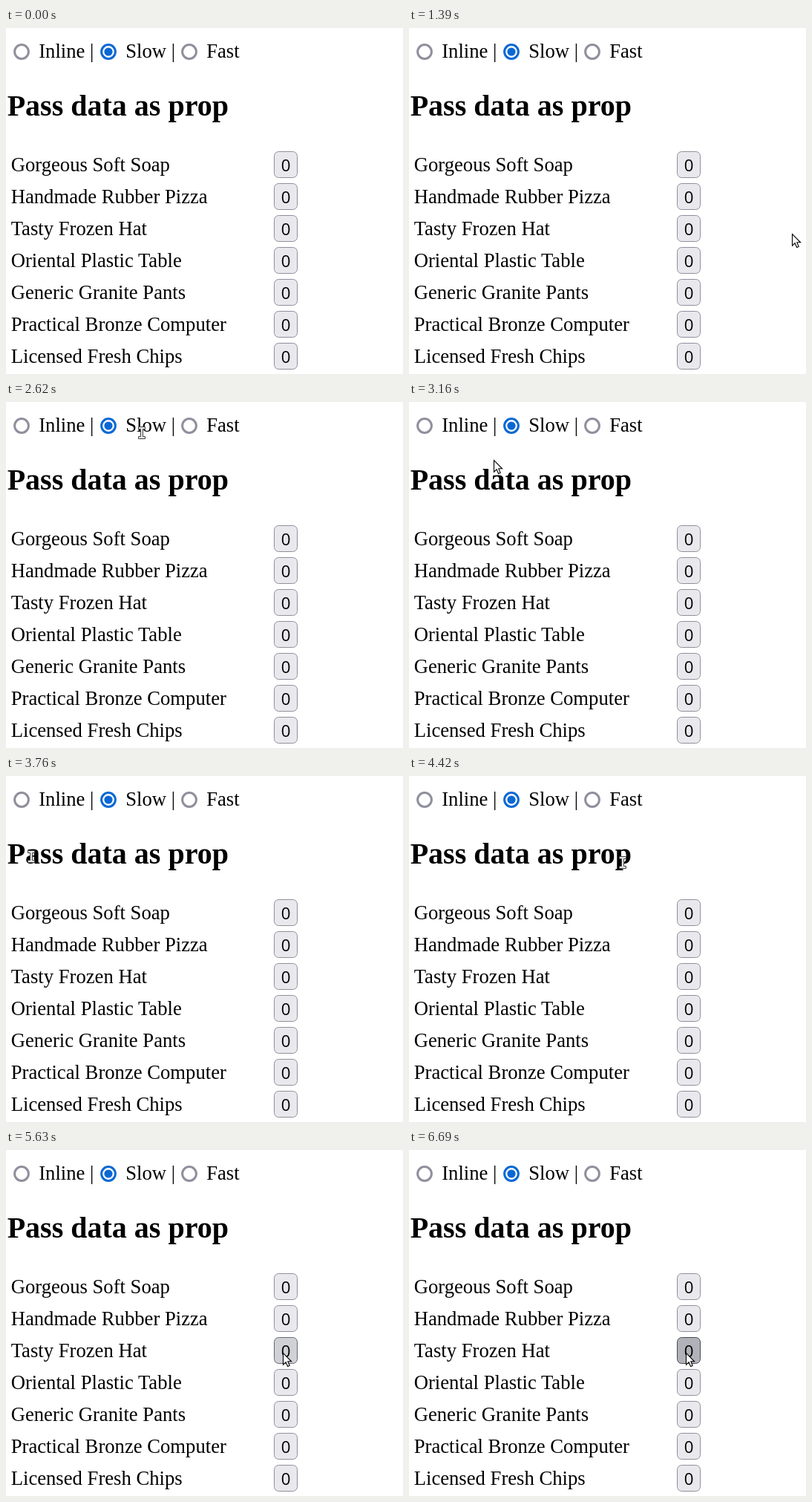
Recreate the animation shown at these times as an HTML page. Size 535 px wide and 466 px high, loop 8000 ms.

```html
<!DOCTYPE html>
<html lang="en">
<head>
<meta charset="utf-8">
<title>Pass data as prop</title>
<style>
  html, body { margin: 0; width: 100%; height: 100%; overflow: hidden; background: #fff; }
  svg { display: block; width: 535px; height: 466px; }
  text { font: 26.667px "Liberation Serif", serif; white-space: pre; }
  .title { font-size: 40px; font-weight: bold; }
  .count { font: 22.22px "Open Sans", sans-serif; text-anchor: middle; }
  .btn { fill: #e9e9ed; stroke: #8f8f9d; }
  .btn.hover { fill: #d0d0d7; stroke: #676774; }
  .btn.active { fill: #b1b1b9; stroke: #484851; }
  .radio { fill: #fff; stroke: #8f8f9d; stroke-width: 3; }
  .radio.on { stroke: #0a68d4; }
  .dot { fill: #0a68d4; }
  #beam { fill: #e4e4e4; stroke: #444; }
  #arrow { fill: #fff; stroke: #000; stroke-width: 1.1; }
</style>
</head>
<body>
<svg viewBox="0 0 535 466">
  <g id="page"></g>
  <path id="arrow" d="M.5 .5V16.2L4.1 12.8L6.6 18.5L9.2 17.4L6.8 11.8H11.6Z"/>
  <path id="beam" d="M-4.5 -8.5H4.5V-5.5H1.5V4.5H4.5V7.5H-4.5V4.5H-1.5V-5.5H-4.5Z"/>
</svg>
<script>
const LOOP = 8000, PRESS = 6500, STEP = 70;
const [page, arrow, beam] = ['page', 'arrow', 'beam'].map(id => document.getElementById(id));

function add(tag, attrs, text = '') {
  const el = document.createElementNS('http://www.w3.org/2000/svg', tag);
  for (const k in attrs) el.setAttribute(k, attrs[k]);
  el.textContent = text;
  return page.appendChild(el);
}

function radio(cx, label, on) {
  add('circle', { class: on ? 'radio on' : 'radio', cx, cy: 32, r: 9.4 });
  if (on) add('circle', { class: 'dot', cx, cy: 32, r: 5.6 });
  add('text', { x: cx + 23.2, y: 40 }, label);
}

radio(21, 'Inline |');
radio(138, 'Slow |', true);
radio(247, 'Fast');
add('text', { class: 'title', x: 1.7, y: 118 }, 'Pass data as prop');

const buttons = [
  'Gorgeous Soft Soap', 'Handmade Rubber Pizza', 'Tasty Frozen Hat',
  'Oriental Plastic Table', 'Generic Granite Pants',
  'Practical Bronze Computer', 'Licensed Fresh Chips'
].map((name, i) => {
  const y = 166 + i * 43;
  add('text', { x: 6.7, y: y + 27 }, name);
  const box = add('rect', { class: 'btn', x: 361.5, y: y + .5, width: 31, height: 35, rx: 6 });
  add('text', { class: 'count', x: 377, y: y + 27 }, '0');
  return { box, y };
});

// Pointer legs: start, end, and the place reached; each sets off from the one before
const entry = { x: 579, y: 314 };
const legs = [
  [1390, 2010, 176, 76],
  [2280, 2410, 134, 34], [2480, 2620, 183, 42], [2690, 3030, 181, 58],
  [3090, 3540, 20, 105], [3610, 3750, 34, 109], [3820, 3890, 90, 112],
  [3960, 4420, 288, 117], [4490, 4620, 310, 115],
  [4950, 5220, 353, 247], [5290, 5630, 373, 273]
].map(([start, end, x, y]) => ({ start, end, x, y }));

const easeOut = p => 1 - (1 - p) ** 1.6;

function pointerAt(t) {
  const i = legs.findLastIndex(leg => t >= leg.start);
  if (i < 0) return { x: -50, y: -50 };
  const to = legs[i], from = legs[i - 1] || entry;
  const gaps = Math.round((to.end - to.start) / STEP);
  const step = Math.floor((t - to.start) / (to.end - to.start) * gaps + .1) + 1;
  const f = easeOut(Math.min(1, step / (gaps + 1)));
  const mix = (a, b) => Math.round(a + (b - a) * f);
  return { x: mix(from.x, to.x), y: mix(from.y, to.y) };
}

const within = ({ x, y }, l, t, r, b) => x >= l && x <= r && y >= t && y <= b;
const overText = p => within(p, 161, 17, 216, 47) || within(p, 1, 82, 300, 128);

function render(t) {
  const p = pointerAt(t);
  const text = overText(p);
  beam.style.display = text ? '' : 'none';
  arrow.style.display = text ? 'none' : '';
  (text ? beam : arrow).setAttribute('transform', `translate(${p.x} ${p.y})`);
  for (const { box, y } of buttons) {
    const over = within(p, 361, y, 393, y + 36);
    box.setAttribute('class', !over ? 'btn' : t >= PRESS ? 'btn active' : 'btn hover');
  }
}

const origin = performance.now();
function tick() {
  render((performance.now() - origin) % LOOP);
  requestAnimationFrame(tick);
}
tick();
</script>
</body>
</html>
```
